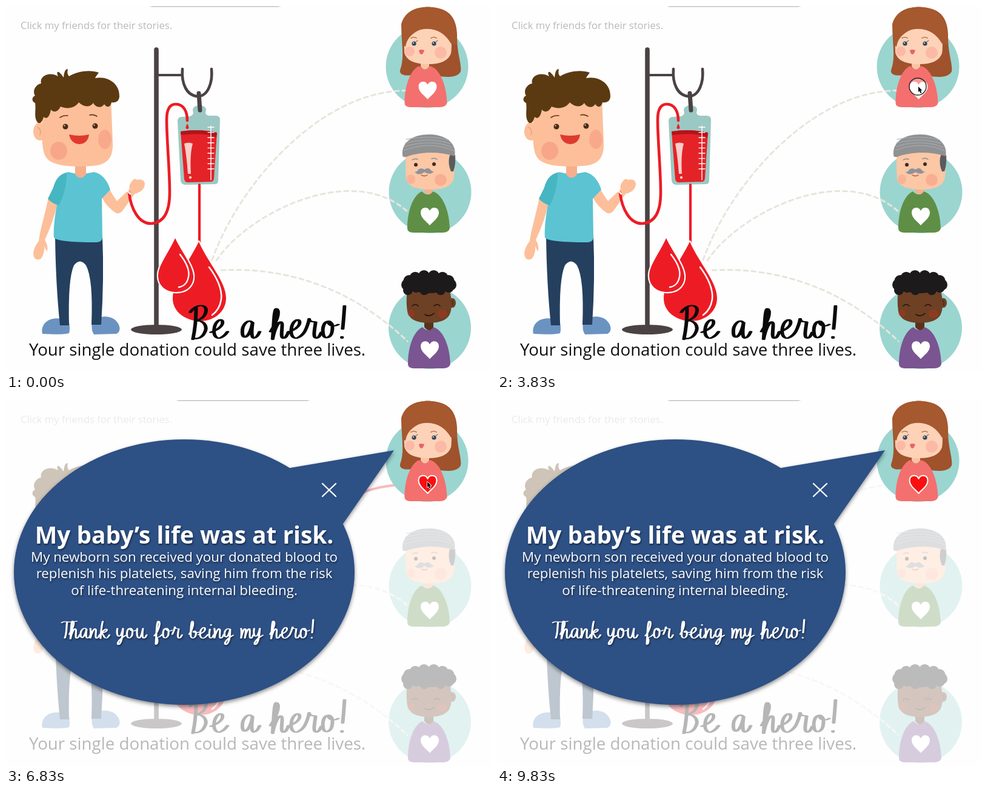
These frames come from a looping animation (800x604 px, 9.99 s). An HTML page with a canvas:

```html
<!DOCTYPE html>
<html lang="en">
<head>
<meta charset="utf-8">
<title>Be a hero!</title>
<style>
html, body { margin: 0; width: 100%; height: 100%; overflow: hidden; background: #fefefe; }
canvas { display: block; }
</style>
</head>
<body>
<canvas id="stage" width="800" height="604" role="img" aria-label="Be a hero! Your single donation could save three lives."></canvas>
<script>
const ctx = document.getElementById('stage').getContext('2d');
const LOOP = 9990, STEP = LOOP / 60;
const SANS = '"Open Sans", "Noto Sans", sans-serif';
const RED = '#ed1c24', SKIN = '#fcbf9a', IRON = '#4a4243', TEAL = '#9bd5d0';

// ---------- helpers ----------
const clamp = v => Math.max(0, Math.min(1, v));
const ramp = (t, a, b) => clamp((t - a) / (b - a));
const ease = p => p * p * (3 - 2 * p);
const mix = (a, b, p) => a + (b - a) * p;

function fill(d, color) {
  ctx.fillStyle = color;
  ctx.fill(new Path2D(d));
}
function line(d, color, width) {
  ctx.strokeStyle = color;
  ctx.lineWidth = width;
  ctx.stroke(new Path2D(d));
}
function oval(x, y, rx, ry, color) {
  ctx.fillStyle = color;
  ctx.beginPath();
  ctx.ellipse(x, y, rx, ry, 0, 0, 7);
  ctx.fill();
}
const dot = (x, y, r, color) => oval(x, y, r, r, color);

function text(s, x, y, size, color, weight = 400, align = 'left') {
  ctx.font = `${weight} ${size}px ${SANS}`;
  ctx.textAlign = align;
  ctx.fillStyle = color;
  ctx.fillText(s, x, y);
}
function heart(x, y, color, edge) {
  ctx.save();
  ctx.translate(x, y);
  const d = 'M0 15 C-5 9 -15 3 -15 -6 C-15 -16 -3 -17 0 -9 C3 -17 15 -16 15 -6 C15 3 5 9 0 15Z';
  fill(d, color);
  if (edge) line(d, edge, 2);
  ctx.restore();
}

// ---------- brush lettering: [strokes, advance] ----------
const GLYPHS = {
  B: ['M9 -47 C9 -30 7 -12 4 2 M0 -40 C8 -54 28 -54 24 -40 C22 -32 14 -28 9 -27 C21 -28 28 -18 22 -8 C18 0 10 2 5 0', 32],
  T: ['M0 -41 C8 -48 18 -39 40 -45 M14 -43 C12 -30 14 -14 8 0', 20],
  a: ['M19 -23 C14 -32 2 -22 3 -8 C4 4 14 0 19 -24 C17 -10 17 0 21 0 C25 0 28 -5 30 -10', 27],
  b: ['M0 -10 C8 -20 13 -40 9 -45 C5 -46 4 -20 4 -6 C6 4 18 0 18 -12 C18 -22 12 -20 11 -16 C16 -14 22 -14 25 -16', 24],
  e: ['M0 -9 C8 -12 20 -18 18 -26 C16 -32 6 -26 5 -13 C4 -2 10 1 14 0 C20 -2 24 -7 26 -10', 26],
  f: ['M2 -6 C12 -16 20 -40 14 -45 C8 -48 8 -10 6 16 C8 20 14 6 8 -2 C16 -2 20 -6 23 -10', 22],
  g: ['M18 -22 C13 -30 2 -22 3 -9 C4 2 14 -2 18 -24 C18 -6 15 12 8 17 C0 18 4 4 26 -8', 25],
  h: ['M0 -10 C8 -22 15 -40 10 -45 C5 -50 5 -20 3 2 C6 -14 12 -26 16 -25 C21 -24 14 -2 19 0 C23 1 26 -5 28 -10', 27],
  i: ['M5 -24 C3 -12 2 0 7 0 C11 0 14 -5 16 -10 M8 -36 L8 -34', 15],
  k: ['M9 -45 C5 -30 4 -10 3 1 M4 -10 C10 -20 18 -28 20 -22 C20 -16 10 -14 6 -13 C12 -10 12 0 18 0 C22 0 25 -5 27 -9', 25],
  m: ['M2 -26 C4 -18 3 -8 2 0 C5 -14 9 -26 13 -25 C17 -22 13 -8 12 0 C15 -14 20 -26 24 -25 C28 -22 22 -2 27 0 C31 1 33 -5 35 -10', 34],
  n: ['M2 -26 C4 -18 3 -8 2 0 C5 -14 11 -26 15 -25 C20 -24 13 -2 18 0 C22 1 25 -5 27 -10', 26],
  o: ['M14 -26 C4 -28 2 -14 4 -5 C6 3 17 0 18 -13 C19 -22 16 -27 12 -24 C14 -18 22 -18 27 -21', 28],
  r: ['M0 -10 C3 -16 6 -24 7 -30 C7 -24 14 -26 17 -25 C16 -16 12 0 18 0 C22 0 24 -5 26 -9', 25],
  u: ['M3 -26 C0 -10 3 0 8 0 C13 -2 16 -14 18 -26 C16 -10 16 0 20 0 C24 0 26 -5 28 -9', 26],
  y: ['M3 -26 C0 -10 4 -4 8 -5 C13 -6 16 -16 18 -26 C17 -8 14 12 7 17 C0 18 4 4 26 -8', 25],
  '!': ['M9 -50 C8 -35 7 -22 6 -14 M5 -2 L5 0', 12]
};
const NIB = 0.38, SPACE = 20;

// A flat nib makes down strokes thick and cross strokes thin.
function script(s, x, y, size, width, color) {
  const path = new Path2D();
  for (const ch of s) {
    if (ch === ' ') { x += SPACE * size; continue; }
    const [d, advance] = GLYPHS[ch];
    path.addPath(new Path2D(d), new DOMMatrix([size, 0, 0, size / NIB, x, y / NIB]));
    x += advance * size;
  }
  ctx.save();
  ctx.scale(1, NIB);
  ctx.strokeStyle = color;
  ctx.lineWidth = width;
  ctx.stroke(path);
  ctx.restore();
}

// ---------- donor ----------
function donor() {
  fill('M60 541 C56 524 72 513 90 516 L104 522 Q106 534 104 540 Q95 543 60 541Z', '#6b93c1');
  fill('M142 522 C150 510 172 510 181 519 C190 528 189 538 182 541 L145 542 Q140 535 142 522Z', '#6b93c1');
  fill('M81 380 L159 380 Q162 450 157 526 L141 526 Q144 450 132 428 Q122 415 112 428 Q102 450 104 527 L89 527 Q82 460 81 380Z', '#253f5f');
  fill('M70 316 C64 345 56 370 54 388 C46 398 42 410 48 417 Q57 422 61 411 Q64 404 63 396 Q65 402 68 405 Q70 396 64 386 Q78 356 85 326Z', SKIN);
  fill('M157 314 Q166 332 182 342 Q189 344 195 334 L212 310 Q228 306 229 294 Q228 284 216 287 Q212 283 207 290 Q202 296 204 302 L183 322 Q176 312 169 300Z', SKIN);
  fill('M103 274 C92 276 82 284 78 300 L70 318 L84 328 C80 350 78 370 79 382 Q84 390 150 390 Q160 389 159 380 L158 318 L172 303 Q164 278 145 274 Q122 280 103 274Z', '#5bc3d1');
  fill('M100 275 C90 277 82 284 78 300 L69 318 Q76 326 87 329 Q100 305 100 275Z', '#46b6c2');
  fill('M114 258 L132 258 L132 278 Q123 289 114 278Z', '#f6ae8b');

  oval(56, 207, 11, 15, SKIN);
  line('M52 200 Q59 204 56 213', '#eda07e', 1.5);
  fill('M62 165 C58 205 58 234 65 248 C74 265 110 266 140 264 C168 263 177 250 176 225 L173 150 L70 145Z', SKIN);
  oval(87, 239, 14, 15, 'rgba(243,130,112,.4)');
  oval(163, 220, 11, 16, 'rgba(243,130,112,.35)');
  fill('M53 193 C45 185 50 172 48 160 C42 158 42 150 48 148 C42 138 52 128 58 128 C55 115 72 108 86 116 C82 108 86 104 95 118 C96 108 98 104 102 104 C101 110 101 112 104 116 C118 107 140 105 153 110 C150 114 148 116 147 119 C168 115 188 128 187 150 C186 158 180 160 174 159 C172 168 166 168 162 162 C158 169 148 168 144 160 C138 168 128 167 120 159 C114 168 102 171 90 166 C86 174 80 177 74 171 C72 182 68 188 62 183 C60 190 58 194 53 193Z', '#5b3a12');
  dot(98, 199, 4.5, '#4a2c17');
  dot(147, 198, 4.5, '#4a2c17');
  dot(96.5, 197.5, 1, '#fff');
  dot(145.5, 196.5, 1, '#fff');
  line('M89 184 Q95 180 102 181', '#5b3a12', 1.6);
  line('M138 180 Q144 178 150 182', '#5b3a12', 1.6);
  fill('M104 212 Q121 216 137 212 Q135 227 121 228 Q107 227 104 212Z', '#e03a2f');
}

// ---------- stand, bag, drops ----------
function drip() {
  line('M248 72 L248 530', IRON, 7.6);
  oval(248, 534, 42, 8, IRON);
  line('M250 114 L291 114', IRON, 4);
  line('M291 104 C289 128 298 148 316 149 C334 149 341 125 339 104', IRON, 4.6);

  fill('M283 190 Q283 183 290 183 L304 182 Q311 179 308 172 Q309 164 319 164 Q330 164 330 172 Q327 179 334 181 L346 181 Q353 181 353 188 L350 288 Q350 294 344 294 L296 295 Q289 295 288 288Z', '#9cc8c3');
  line('M318 144 L320 172', IRON, 7);
  fill('M288 207 Q318 202 348 209 L343 285 Q342 290 338 290 L300 291 Q295 291 294 286Z', '#e42328');
  fill('M288 207 Q318 202 348 209 L347 217 Q330 208 289 213Z', '#b3141b');
  fill('M294 227 Q301 224 308 227 Q303 245 305 277 L300 277 Q298 248 294 227Z', '#f9cfc9');
  dot(304, 283, 2.2, '#f9cfc9');
  line('M338 198 L338 287', '#fff', 1.4);
  for (let i = 0; i < 9; i++) line(`M333 ${200 + i * 8.6} h10`, '#fff', 1.4);
  line('M203 308 C206 335 219 359 239 359 C261 358 270 338 270 308 C270 270 265 220 265 188 C265 170 270 162 280 162 C293 162 299 174 299 189', RED, 4.6);
  line('M201 306 L205 310', '#fff', 2.5);
  fill('M299 194 Q294 203 299 203 Q304 203 299 194Z', RED);
  line('M319 295 L319 392', RED, 4.2);

  const big = 'M318 389 C300 425 275 455 275 483 C275 505 297 520 320 520 C344 520 363 504 363 482 C363 455 334 425 318 389Z';
  line(big, '#fff', 4);
  fill(big, RED);
  line('M335 431 C348 448 357 468 355 484 C353 497 347 505 340 510', '#fff', 2.6);
  const small = 'M279 383 C268 408 251 428 251 445 C251 462 264 472 281 472 C298 472 310 461 309 445 C308 428 291 408 279 383Z';
  line(small, '#fff', 4.5);
  fill(small, RED);
  line('M287 410 C298 424 303 437 301 447 C299 458 292 463 285 464', '#fff', 2.4);
}

// ---------- friends ----------
const halo = (x, y) => dot(x, y, 68, TEAL);
const girlHalo = () => halo(694.5, 100);

function torso(x, y, color) {
  ctx.save();
  ctx.translate(x, y);
  fill('M-35 60 C-35 30 -25 5 -11 -1 Q-1 9 7 -1 C22 3 34 28 35 60 Q33 67 23 67 L-25 67 Q-35 67 -35 60Z', color);
  ctx.restore();
}

function girl(loved) {
  fill('M652 30 C658 5 690 -2 708 3 C735 6 744 25 744 50 C744 80 752 95 750 108 C745 119 725 118 712 115 L668 114 C655 116 649 112 650 106 C658 85 652 60 652 30Z', '#9f522c');
  torso(692.5, 100, '#f3706e');
  fill('M684 90 L698 90 L698 100 Q691 109 684 100Z', '#f9c3a4');
  fill('M659 38 L730 28 Q737 60 734 78 Q728 96 696 96 Q662 96 657 77 Q656 55 659 38Z', '#fdd2b7');
  dot(666, 75, 8, 'rgba(246,140,135,.35)');
  dot(717, 77, 10, 'rgba(246,140,135,.35)');
  fill('M653 38 C654 60 655 66 659 67 C661 54 670 44 684 39 C706 34 724 44 734 62 L744 64 C747 20 725 2 700 2 C670 0 651 15 653 38Z', '#a6582e');
  for (const x of [673, 706]) {
    dot(x, 62, 3.6, '#33475c');
    dot(x - 1, 61, 1, '#fff');
    line(`M${x - 5} 53 q5 -3 9 0`, '#8a4a22', 1.2);
    line(`M${x + 3} 59 l3 -2`, '#33475c', 1);
  }
  fill('M681 73 Q685 71 690 73 Q688 80 685 80 Q682 79 681 73Z', '#e9626a');
  heart(695.5, 139, loved ? '#fa0f10' : '#fff', loved && '#fff');
}

function elder() {
  torso(697, 307, '#5f8f46');
  fill('M690 296 L704 296 L704 306 Q697 316 690 306Z', '#f5b08c');
  fill('M660 240 L738 240 Q742 270 738 286 Q733 303 700 303 Q664 303 660 286 Q658 262 660 240Z', '#fcc7a5');
  dot(717, 287, 10, 'rgba(243,130,112,.35)');
  oval(668, 286, 7, 8, 'rgba(243,130,112,.28)');
  fill('M733 244 L741 246 Q742 262 738 273 L734 273 Q729 262 731 250Z', '#5b5b5e');
  fill('M654 246 C652 222 675 211 700 212 C730 213 744 230 740 248 C715 240 685 240 660 249 Q654 250 654 246Z', '#8f9193');
  for (let i = 0; i < 4; i++) line(`M${657 + i} ${238 - i * 6} Q700 ${222 - i * 3} ${739 - i * 3} ${239 - i * 6}`, '#aaadaf', 1.2);
  dot(676, 262, 3, '#3b2a22');
  dot(706, 261, 3, '#3b2a22');
  line('M670 254 q5 -3 9 -1 M702 252 q5 -2 9 1', '#8b8c90', 1.4);
  fill('M690 270 Q697 265 701 271 Q703 274 706 273 Q700 280 690 274 Q681 281 674 274 Q678 274 680 270 Q685 266 690 270Z', '#8e939b');
  line('M685 279 Q690 282 695 279', '#b5533f', 1.4);
  heart(699, 347, '#fff');
}

function kid() {
  torso(698, 531, '#7a5591');
  fill('M690 518 L705 518 L705 530 Q698 540 690 530Z', '#5a321b');
  oval(736, 490, 6, 8, '#6e4024');
  fill('M661 478 Q661 462 690 460 L730 462 Q738 490 733 506 Q728 523 697 523 Q666 523 662 504 Q660 490 661 478Z', '#6e4024');
  oval(668, 507, 6, 6, 'rgba(200,50,35,.35)');
  oval(720, 508, 8, 7, 'rgba(200,50,35,.35)');
  // curls: a crown above, a fringe below
  for (let i = 0; i < 8; i++) {
    const a = Math.PI * (1 + i / 7);
    dot(697.5 + 36 * Math.cos(a), 460 - 15 * Math.abs(Math.sin(a)), 9.5, '#1d1a1c');
  }
  oval(698, 458, 36, 16, '#1d1a1c');
  for (let i = 0; i < 6; i++) dot(663 + i * 13.5, 469 - i % 2 * 4, 8, '#1d1a1c');
  line('M670 495 q5 -5 10 0 M706 495 q5 -5 10 0', '#21120a', 1.6);
  line('M691 509 Q699 514 706 507', '#21120a', 1.6);
  line('M735 486 q4 3 1 8', '#452512', 1.2);
  heart(699, 567.5, '#fff');
}

// ---------- links ----------
const LINKS = [
  'M340 419 C383 297 516 141 659 139.5',
  'M347 420 C400 340 575 255 665 342',
  'M355 436 C470 430 575 470 662 553'
];
const probe = document.createElementNS('http://www.w3.org/2000/svg', 'path');
probe.setAttribute('d', LINKS[0]);
const linkLength = probe.getTotalLength();

function links(grow, alpha) {
  ctx.setLineDash([7, 6]);
  LINKS.forEach(d => line(d, '#e7e5db', 3));
  if (grow > 0 && alpha > 0) {
    ctx.save();
    ctx.globalAlpha = alpha;
    ctx.setLineDash([linkLength * grow, linkLength * 2]);
    line(LINKS[0], '#e9171e', 4);
    ctx.restore();
  }
  ctx.setLineDash([]);
}

// ---------- story bubble ----------
function shadow(color, blur, dy) {
  ctx.shadowColor = color;
  ctx.shadowBlur = blur;
  ctx.shadowOffsetY = dy;
}
function bubble(alpha) {
  ctx.save();
  ctx.globalAlpha = alpha;
  shadow('rgba(0,0,0,.45)', 6, 3);
  ctx.fillStyle = '#2d5085';
  ctx.beginPath();
  ctx.ellipse(294, 284, 281, 219, 0, 0, Math.PI * 2);
  ctx.moveTo(294, 284);
  ctx.lineTo(469, 112);
  ctx.lineTo(640, 83);
  ctx.lineTo(556, 204);
  ctx.closePath();
  ctx.fill();
  shadow('transparent', 0, 0);
  line('M522 138 L544 159 M544 138 L522 159', '#fff', 2.4);
  shadow('rgba(0,0,0,.5)', 3, 2);
  ctx.shadowOffsetX = 1;
  text('My baby’s life was at risk.', 294, 237, 38.8, '#fff', 700, 'center');
  ['My newborn son received your donated blood to',
   'replenish his platelets, saving him from the risk',
   'of life-threatening internal bleeding.'
  ].forEach((s, i) => text(s, 294, 267 + i * 27.3, 22.3, '#fff', 400, 'center'));
  script('Thank you for being my hero!', 92, 393, 0.62, 3.2, '#fff');
  ctx.restore();
}

// ---------- pointer ----------
function pointer(t) {
  if (t < 1320 || t > 9000) return;
  const go = ease(ramp(t, 2000, 3330)), back = ease(ramp(t, 6990, 7800));
  let x = mix(585, 695, go), y = mix(40, 133, go);
  y += 2 * ramp(t, 4000, 4300);
  x = mix(x, 586, back);
  y = mix(y, 68, back);

  if (t > 3640 && t < 4100) {
    dot(694, 133, 14, 'rgba(255,255,255,.3)');
    ctx.beginPath();
    ctx.arc(694, 133, 14, 0, 7);
    ctx.strokeStyle = '#222';
    ctx.lineWidth = 1.4;
    ctx.stroke();
  }
  ctx.save();
  ctx.translate(x, y);
  if (t > 5980 && t < 6480) {
    const hand = 'M-2 1 Q0 -1 1 1 L1 4 L4 5 Q6 5 6 7 L5 11 L0 11 L-3 7 Q-3 5 -1 6Z';
    line(hand, '#111', 1.6);
    fill(hand, '#fff');
  } else {
    const arrow = 'M0 0 L0 9 L2 7.2 L3.8 11 L5.4 10.2 L3.8 6.6 L6.4 6.4Z';
    line(arrow, '#fff', 1.6);
    fill(arrow, '#000');
  }
  ctx.restore();
}

function tab(t) {
  const slide = ease(ramp(t, 160, 700));
  ctx.save();
  shadow('rgba(60,70,80,.5)', 3, 0);
  ctx.fillStyle = slide > 0 ? '#b4b4b8' : '#a5bcc5';
  ctx.beginPath();
  ctx.roundRect(mix(236, 280, slide), -12, mix(218, 222, slide), 12.5, 5);
  ctx.fill();
  ctx.restore();
}

function draw(t) {
  const veil = ramp(t, 6320, 6800);
  const loved = t > 5820;
  ctx.fillStyle = '#fefefe';
  ctx.fillRect(0, 0, 800, 604);
  ctx.lineCap = ctx.lineJoin = 'round';

  text('Click my friends for their stories.', 24, 38, 16.6, '#b9b9b9');
  girlHalo();
  halo(699.5, 307);
  halo(699, 531);
  links(ease(ramp(t, 4000, 5830)), 1 - ramp(t, 6990, 7330));
  donor();
  drip();
  girl(loved);
  elder();
  kid();
  script('Be a hero!', 304, 548, 1.06, 6, '#0a0a0a');
  text('Your single donation could save three lives.', 38, 577, 27.7, '#111');

  if (veil > 0) {
    ctx.fillStyle = `rgba(255,255,255,${0.7 * veil})`;
    ctx.fillRect(0, 0, 800, 604);
    girlHalo();
    girl(loved);
    bubble(veil);
  }
  tab(t);
  pointer(t);
}

let shown = -1;
const start = performance.now();
function tick(now) {
  const step = Math.floor(Math.max(0, now - start) % LOOP / STEP);
  if (step !== shown) draw((shown = step) * STEP);
  requestAnimationFrame(tick);
}
tick(start);
</script>
</body>
</html>
```
